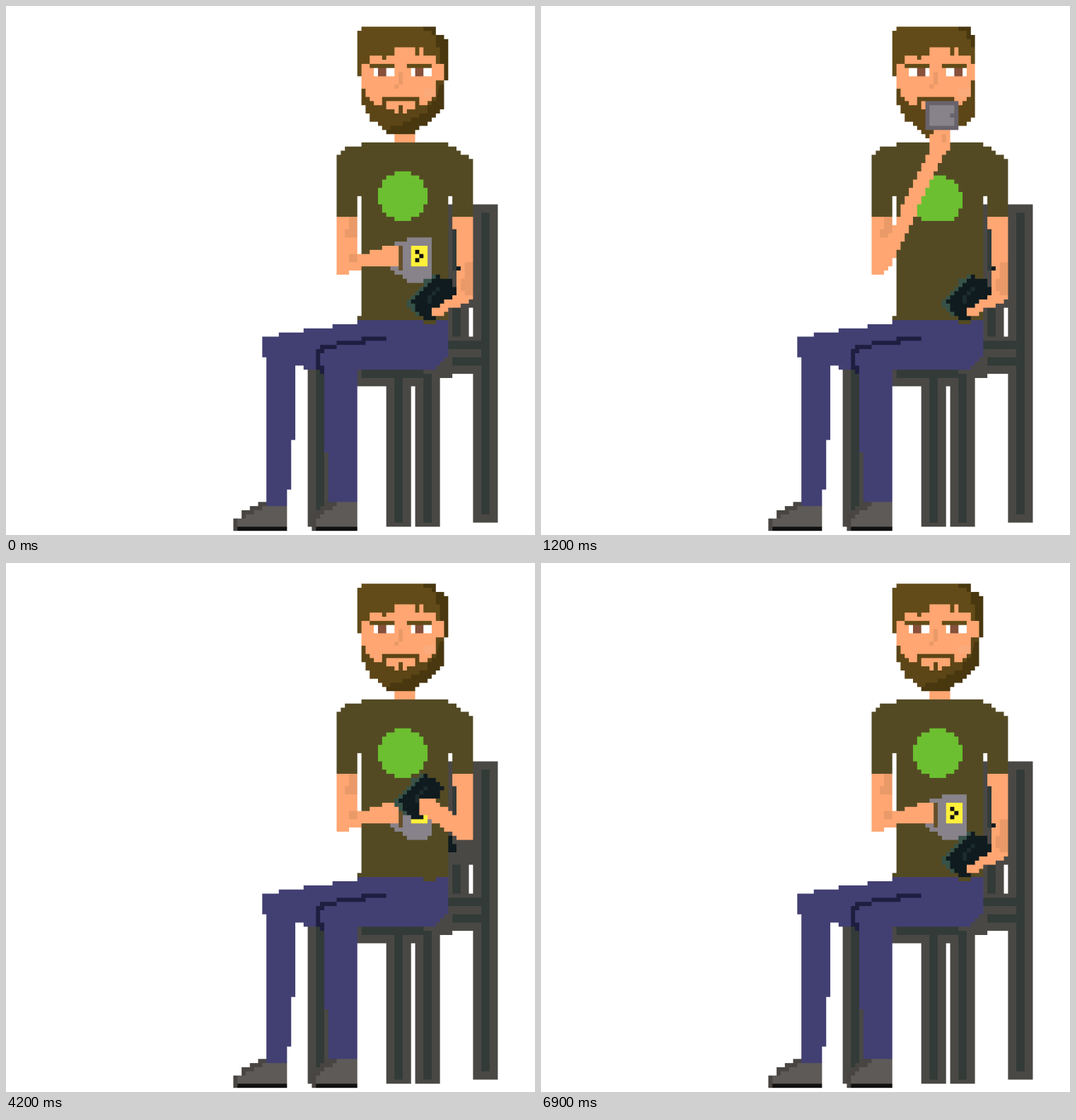
Recreate the animation shown at these times as an HTML page with a canvas. Size 748 px wide and 748 px high, loop 7100 ms.

```html
<!DOCTYPE html>
<html lang="en">
<head>
<meta charset="utf-8">
<title>Coffee break</title>
<style>
  html, body { margin: 0; width: 100%; height: 100%; overflow: hidden; background: #fff; }
  canvas { display: block; width: 100vw; height: 100vh; }
</style>
</head>
<body>
<canvas id="stage" width="768" height="768"></canvas>
<script>
const ctx = document.getElementById('stage').getContext('2d');
ctx.scale(6, 6); // all coordinates are cells of a 128 x 128 grid
const LOOP = 7100;
const C = {
  steel: '#4a4845', steelDark: '#323b38', jeans: '#423f73', crease: '#1f1d40',
  shoe: '#5d5a57', toe: '#484542', shirt: '#534a24', green: '#6cbf30',
  skin: '#ffa672', shade: '#ea9a68', hair: '#624b18', beard: '#5c4516', dark: '#48370f',
  iris: '#86503a', cup: '#88828a', cupDark: '#68626b', label: '#fff03a',
  phone: '#0f1b1e', phoneLight: '#1c2b2d', phoneEdge: '#375248', glow: '#5fa18f'
};

function rect(color, x, y, w, h) {
  ctx.fillStyle = color;
  ctx.fillRect(x, y, w, h);
}

function shape(color, d) {
  ctx.fillStyle = color;
  ctx.fill(new Path2D(d));
}

// A slanted limb built from one horizontal run per row.
function limb(color, x0, y0, x1, y1, width) {
  for (let y = y0; y < y1; y++) {
    rect(color, Math.round(x0 + (x1 - x0) * (y - y0) / (y1 - y0)), y, width, 1);
  }
}

// A thick line that covers each cell whose centre lies within the radius.
function stroke(color, x0, y0, x1, y1, radius) {
  const dx = x1 - x0, dy = y1 - y0, len2 = dx * dx + dy * dy;
  for (let y = 30; y < 80; y++) for (let x = 78; x < 116; x++) {
    const px = x + .5 - x0, py = y + .5 - y0;
    const k = Math.max(0, Math.min(1, (px * dx + py * dy) / len2));
    if (Math.hypot(px - k * dx, py - k * dy) <= radius) rect(color, x, y, 1, 1);
  }
}

function shifted(dx, dy, draw) {
  ctx.save();
  ctx.translate(dx, dy);
  draw();
  ctx.restore();
}

function chair(slit) {
  rect(C.steel, 107, 48, 6, 37);
  rect(C.steelDark, 108, 54, 2, 10);
  rect(C.steelDark, 108, 73, 2, 7);
  shape(C.phone, 'M107 66h1v2h1v2h-2z');
  if (slit) rect('#fff', 112, 73, 1, 7);
  rect(C.steel, 113, 48, 6, 77);
  rect(C.steelDark, 115, 50, 2, 73);
  rect(C.steel, 107, 80, 8, 5);
  rect(C.steelDark, 107, 81, 8, 2);
  rect(C.steel, 104, 85, 11, 4);
  rect(C.steelDark, 108, 85, 7, 2);
  rect(C.steel, 105, 87, 3, 3);
  rect(C.steel, 85, 88, 20, 4);
  rect(C.steelDark, 86, 88, 15, 2);
  rect(C.steel, 73, 88, 5, 38);
  rect(C.steelDark, 75, 88, 2, 36);
  for (const x of [92, 99]) {
    rect(C.steel, x, 92, 6, 34);
    rect(C.steelDark, x + 2, 89, 2, 36);
  }
}

function legs() {
  shape(C.jeans, 'M85 76H107V85H106V86H105V87H104V88H85V120H78V108H77V88H72V87H70V105H69V117H68V121H63V85H62V80H66V79H72V78H79V77H85z');
  rect(C.crease, 86, 80, 6, 1);
  rect(C.crease, 80, 81, 7, 1);
  rect(C.crease, 76, 82, 4, 1);
  shape(C.crease, 'M75 83h2v1h-1v3h1v2h-1v-1h-1z');
  shape(C.shoe, 'M61 120h2v1h5v5H55v-2h2v-2h2v-1h2z');
  shape(C.toe, 'M61 120h2v1h-1v1h-2v1h-2v1h-3h2v-2h2v-1h2z');
  rect(C.toe, 55, 124, 1, 3);
  rect('#111', 56, 126, 12, 1);
  shape(C.shoe, 'M79 120h6v6H74v-2h1v-1h1v-1h1v-1h2z');
  shape(C.toe, 'M79 120h1v1h-1v1h-2v1h-1v1h-2v-1h1v-1h1v-1h1v-1h2z');
  rect(C.toe, 74, 124, 1, 3);
  rect('#111', 75, 126, 10, 1);
}

function badge() {
  shape(C.green, 'M94 40h4v1h2v1h1v2h1v4h-1v2h-1v1h-2v1h-4v-1h-2v-1h-1v-2h-1v-4h1v-2h1v-1h2z');
}

function torso(turned) {
  rect(C.skin, 94, 31, 5, 2);
  shape(C.shirt, 'M86 33H107V34H109V35H110V36H112V37H113V51H108V46H107V76H104V77H101V76H85V75H86V46H85V51H80V36H81V35H82V34H86z');
  shifted(0, turned ? 1 : 0, badge);
  if (turned) rect(C.shirt, 92, 52, 8, 1);
}

function eyes(shift, lowered) {
  for (const x of [89, 98]) {
    rect('#fff', x, 15, 5, 2);
    if (lowered) rect(C.iris, x + 2, 16, 3, 1);
    else rect(C.iris, x + 1 + shift, 15, 2, 2);
  }
}

// Both beards share the edge around the mouth and the left side.
const BEARD_INNER = 'M86 20h1v2h1v1h1v1h3v1h2v1h1v-2h1v2h1v-1h2v-1h3v-1h1v-1h1v-4';
const BEARD_LEFT = 'v-1h-1v-1h-1v-1h-2v-2h-1v-2h-1z';

function head(turned, shift, lowered) {
  rect(C.skin, 86, 9, 19, 15);
  rect(C.skin, 88, 24, 14, 2);
  shape(C.hair, 'M86 5H104V7H105V14H104V12H101V10H100V12H99V10H94V12H92V13H91V12H88V14H86V17H85V6H86z');
  if (turned) {
    shape(C.dark, 'M101 5h3v2h1v3h-1V8h-1V6h-2z');
    shape(C.beard, BEARD_INNER + 'h1v9h-1v1h-1v1h-2v1h-2v1h-4v1h-2v-1h-1' + BEARD_LEFT);
  } else {
    rect(C.skin, 104, 14, 2, 4);
    shape(C.dark, 'M101 5H104V7H106V8H107V18H106V14H105V10H104V7H103V6H101z');
    shape(C.beard, BEARD_INNER + 'h2v7h-1v1h-1v1h-1v1h-1v1h-2v1h-1v1h-7' + BEARD_LEFT);
    shape(C.dark, 'M105 19h1v6h-1v1h-1v1h-1v1h-1v1h-2v1h-1v1h-7v-1h1v-1h3v-1h2v-1h2v-1h2v-2h1v-1h1z');
  }
  rect(C.hair, 88, 14, 6, 1);
  rect(C.hair, 97, 14, 6, 1);
  rect(C.shade, 95, 16, 1, 3);
  rect(C.shade, 94, 19, 1, 1);
  rect('#fbaa7c', 101, 20, 3, 2);
  shape(C.beard, 'M91 22h9v2h-1v-1h-7v1h-1z');
  eyes(shift, lowered);
}

function mug() {
  shape(C.cup, 'M97 56h6v10h-1v1h-5v-1h-1v-1h-2v-1h-1v-1h2v-4h-2v-1h1v-1h3z');
  rect(C.cupDark, 94, 59, 1, 1);
  rect(C.label, 98, 58, 4, 5);
  rect('#111', 99, 59, 1, 1);
  rect('#111', 100, 60, 1, 1);
  rect('#111', 99, 61, 1, 1);
}

function tiltedMug() {
  shape(C.cup, 'M101 24h3v1h1v3h1v2h1v2h1v2h-1v1h-3v1h-1v-1h-5v-1h2v-2h-1v-1h-2v-2h-1v-2h1v-1h1v-1h3z');
  shape(C.label, 'M101 26h3v2h1v3h-3v-1h-1z');
  shape('#111', 'M102 28h2v2h-1v-1h-1z');
}

function mugAtMouth() {
  rect(C.cupDark, 93, 23, 8, 7);
  rect(C.cup, 94, 24, 6, 5);
  rect(C.cupDark, 99, 26, 1, 1);
}

function upperArm() {
  rect(C.skin, 80, 51, 5, 12);
  rect(C.skin, 80, 63, 4, 1);
  rect(C.skin, 80, 64, 3, 1);
  shape(C.shade, 'M83 51h2v5h-3v-2h1z');
}

function cupArm(pose) {
  if (pose === 'sip' || pose === 'near' || pose === 'lift') {
    if (pose === 'sip') mugAtMouth();
    else shifted(pose === 'near' ? -2 : 0, 0, tiltedMug);
    upperArm();
    limb(C.skin, 94, 34, 80, 64, 4);
    shape(C.skin, 'M95 30h4v5h-5v-4h1z');
    rect(C.shade, 97, 31, 1, 2);
    if (pose !== 'sip') shape(C.beard, 'M98 29h1v2h1v2h1v1h-1v-1h-1v-2h-1z');
    return;
  }
  if (pose > 0) {
    const handY = 60.5 - 27 * pose;
    shifted(Math.round(pose * 2), Math.round(-27 * pose), mug);
    upperArm();
    stroke(C.skin, 82.5, 62, 94, handY, 2.2);
    return;
  }
  mug();
  upperArm();
  shape(C.skin, 'M83 60H88V59H91V58H95V63H86V64H83z');
  rect(C.shade, 83, 60, 2, 2);
  rect('#65502a', 95, 58, 1, 6);
}

function phone() {
  shape(C.phone, 'M103 65h2v1h2v1h1v1h1v1h-1v2h-1v2h-1v1h-1v1h-1v1h-3v-1h-2v-1h-1v-3h1v-1h1v-1h1v-1h1v-2h2z');
  shape(C.phoneEdge, 'M103 65h1v1h-1v1h-1v1h-1v1h-1v1h-1v1h-1v1h1v2h1v1h-1v-1h-1v-1h-1v-2h1v-1h1v-1h1v-1h1v-2h2z');
  shape(C.phoneLight, 'M104 68h1v1h-1v1h-1v2h-1v-2h1v-1h1z');
}

function raisedUpperArm() {
  shape(C.skin, 'M108 51h5v15h-4v-12h-1z');
}

function phoneArm(pose) {
  if (pose === 0) {
    phone();
    shape(C.skin, 'M108 51h5v20h-1v1h-2v1h-3v1h-1v1h-3v-2h2v-1h1v-1h2v-1h1V54h-1z');
    shape(C.shade, 'M111 62h2v8h-2v-1h-1v-3h1z');
    rect(C.phone, 109, 63, 1, 1);
    return;
  }
  if (pose === 'glow') {
    shape(C.glow, 'M95 35h4v1h2v1h1v4h-2v4h-8v1h-2v-1h-1v-5h1v-2h1v-1h2v-1h2z');
  }
  if (pose === 'glow' || pose === 'up') {
    shifted(-7, -29, phone);
    raisedUpperArm();
    limb(C.skin, 98, 45, 108, 66, 5);
    shape(C.skin, 'M99 41h2v2h1v3h-5v-2h2z');
    shape(C.shade, 'M107 53h2v1h1v4h-1v-3h-2z');
    return;
  }
  const dx = Math.round(-7 * pose), dy = Math.round(-29 * pose);
  shifted(dx, dy, phone);
  raisedUpperArm();
  stroke(C.skin, 111, 65, 105 + dx, 73 + dy, 2.3);
}

// Each pose holds until the next start time.
const cupPoses = [[0, 0], [200, .15], [300, .4], [400, .7], [500, 'lift'], [600, 'near'], [700, 'sip'], [3000, .5], [3100, 0]];
const phonePoses = [[0, 0], [4200, .5], [4300, 'up'], [4400, 'glow'], [6000, 'up'], [6400, .5], [6500, 0]];
const gazes = [[0, 0], [200, 1], [700, -1], [1200, 1], [1900, -1], [2500, 1], [3100, 0]];

function at(steps, t) {
  return steps.filter(([start]) => start <= t).pop()[1];
}

function render(now) {
  const t = now % LOOP;
  const turned = t >= 200 && t < 3100;
  rect('#fff', 0, 0, 128, 128);
  chair(t < 6800 || t >= 6900);
  legs();
  torso(turned);
  head(turned, at(gazes, t), t >= 4300 && t < 6500);
  cupArm(at(cupPoses, t));
  phoneArm(at(phonePoses, t));
}

const startTime = performance.now();
function tick() {
  render(performance.now() - startTime);
  requestAnimationFrame(tick);
}
tick();
</script>
</body>
</html>
```
